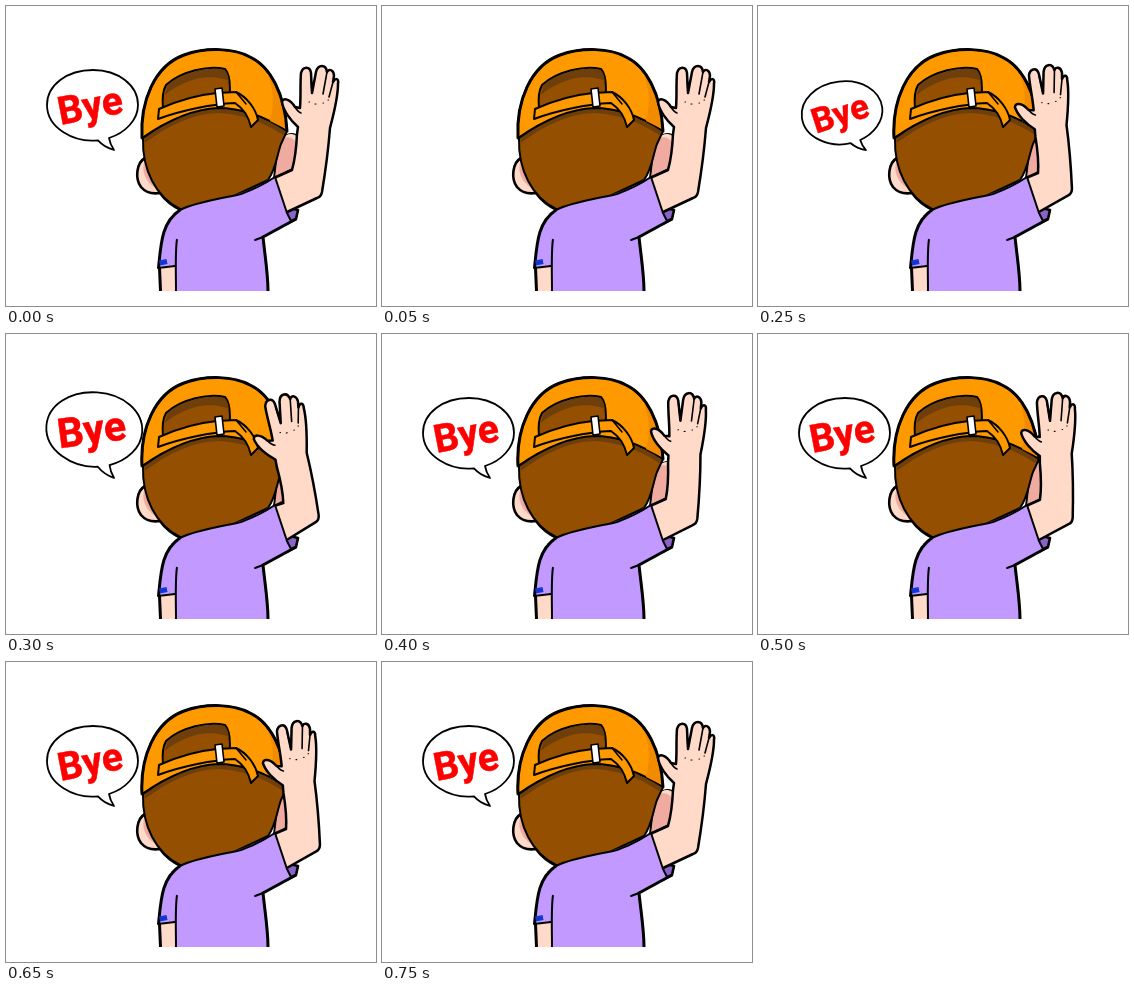
An HTML page for the animation above (1 s loop, 370 px wide and 300 px high).

```html
<!DOCTYPE html>
<html lang="en">
<head>
<meta charset="utf-8">
<title>Waving goodbye</title>
<style>
  html, body { margin: 0; width: 100%; height: 100%; overflow: hidden; background: #fff; }
  svg { display: block; width: 370px; height: 300px; }
  text { font: bold 39px Roboto, Arial, sans-serif; }
  .line { fill: none; }
  .bold { fill: none; stroke-width: 3; }
</style>
</head>
<body>
<svg viewBox="0 0 370 300" stroke="#000" stroke-width="2" stroke-linejoin="round" stroke-linecap="round">
  <!-- ears and neck -->
  <path fill="#ffdac8" stroke-width="2.6" d="M139 152C130 157 129 173 135 181C140 187 147 188 154 187C159 194 166 200 175 204L190 190L150 150Z"/>
  <path fill="#f0aba0" stroke="none" d="M138 157C135 168 142 179 154 185C160 193 167 198 175 202L184 196L150 158Z"/>
  <path fill="#f0aba0" d="M272 138C277 126 291 125 294 134L291 161L268 172Z"/>
  <path fill="#ffdac8" stroke="none" d="M277 132C281 126 291 127 293 134L292 140C289 131 282 130 277 132Z"/>

  <!-- hair -->
  <path fill="#945000" d="M137 132C136 164 150 191 174 203H200L262 174C270 163 271 149 275 138L281 125L211 90Z"/>
  <path fill="#6e3f0b" stroke="none" d="M138 133C164 112 192 103 212 102C238 103 263 113 280 125L277 129C255 114 233 108 212 107C186 108 163 119 139 137Z"/>

  <!-- cap -->
  <path fill="#ff9900" d="M136 132C134 96 148 60 178 49C200 41 228 42 244 51C264 60 279 88 281 125C260 111 236 102 212 102C188 103 162 114 136 132Z"/>
  <path fill="#f28b00" stroke="none" d="M261 66C272 78 279 96 280 123L264 115C269 98 267 81 261 66Z"/>
  <path class="bold" d="M136 132C134 96 148 60 178 49C200 41 228 42 244 51C264 60 279 88 281 125"/>
  <path fill="#945000" d="M157 103C156 92 157 84 160 79C175 65 203 59 219 63C224 69 224 78 224 90Z"/>
  <path fill="#6e3f0b" stroke="none" d="M159 89L161 80C176 66 203 60 218 64C221 66 222 69 223 75C205 67 179 72 159 89Z"/>
  <path fill="#ff9900" d="M153 103C171 95 190 89 211 87L230 86C241 91 250 103 252 114L245 121C243 112 238 103 229 97C207 98 176 104 152 113Z"/>
  <path class="line" stroke-width="1.5" d="M230 86L240 98"/>
  <path fill="#fff" stroke-width="1.6" d="M209 83L216 82L218 100L211 101Z"/>

  <!-- inside of the raised sleeve -->
  <path fill="#8a63c9" stroke-width="2.6" d="M276 200L292 204L290 213L280 218Z"/>
  <path id="arm" fill="#ffdac8" stroke-width="2.5"/>
  <path id="creases" class="line" stroke-width="1.6"/>
  <path id="knuckles" class="line" stroke-width="1.1"/>

  <!-- body -->
  <path fill="#ffdac8" stroke="none" d="M153 261L154 285H171V258Z"/>
  <path class="bold" stroke-linecap="butt" d="M153.500 262L154.500 285"/>
  <path fill="#c299ff" stroke="none" d="M174 204C200 193 238 192 269 171L281 207L285 215L257 232C259 250 262 268 262 285H170V260L152 262C155 236 156 216 174 204Z"/>
  <path class="line" d="M174 204C190 196 209 194 235 188C249 183 260 177 269 171L281 207L285 215M257 231L249 234M152 262L169 260"/>
  <path class="line" stroke-linecap="butt" d="M171 233C169 247 170 268 170 285"/>
  <path class="bold" stroke-linecap="butt" d="M152.500 262C155 236 156 216 174 204M290 213L257 231C259 250 262 268 262 285"/>
  <path stroke="#1238cf" stroke-width="5" stroke-linecap="butt" d="M153.500 257L161 255.500"/>

  <!-- speech bubble, pivoting on the tip of its tail -->
  <g id="bubble">
    <path fill="#fff" stroke-width="1.8" vector-effect="non-scaling-stroke" d="M92 134.300C68 137 41 122 41 99C41 79 61 64 87 64C112 64 132 79 132 99C132 114 119 127 103 132Q104 138 108 144Q98 141 92 134.300Z"/>
    <text transform="translate(54.500 119) rotate(-11)" fill="#f00" stroke="#f00" stroke-width=".5">Bye</text>
  </g>
</svg>
<script>
const $ = id => document.getElementById(id);
const STEP = 50, LOOP = 1000, LAST = 15;
const ELBOW = [298, 194], WRIST = [306, 120];

const hand = `L292,121 C284,114 277,104 276,96
  C277,91 284,93 289,101 L294,102 C295,89 294,78 295,67 C297,60 304,60 305,67 L306,87
  L310,66 C312,58 320,58 321,66 C323,62 328,64 328,70 L327,76 C330,71 333,73 332,78
  C332,92 328,107 324,122`;
const folds = 'M321,66 L317,88 M327,76 L323,91 M305,70 L306,87 M289,101 Q292,106 295,107';
const dots = 'M303,96 L303.500,96 M309,98 L310,98 M317,97 L317.500,97 M322,94 L322.500,94';

// Piecewise linear value through [step, value] keys.
function along(keys, k) {
  const i = Math.max(1, keys.findIndex(p => p[0] >= k));
  const [a, u] = keys[i - 1], [b, v] = keys[i];
  return u + (v - u) * (k - a) / (b - a);
}

const swing = [[0, 0], [3, 0], [6, -18], [9, 2.5], [10, -8], [12, -18], [15, 0]];
const size = [[0, 1], [1, 0], [2, 0.12], [3, 0.385], [5, 0.89], [7, 1.22], [8, 1], [15, 1]];
const tilt = [[0, 0], [1, -48], [3, -28], [7, 14], [8, 0], [15, 0]];

// Turns every coordinate pair of a path about a joint.
function turn(path, deg, [jx, jy]) {
  const r = deg * Math.PI / 180, c = Math.cos(r), s = Math.sin(r);
  return path.replace(/([\d.]+),([\d.]+)/g, (_, px, py) => {
    const x = px - jx, y = py - jy;
    return `${jx + x * c - y * s},${jy + x * s + y * c}`;
  });
}

function draw() {
  const k = Math.min(LAST, Math.floor(performance.now() % LOOP / STEP));
  const angle = along(swing, k);
  const forearm = path => turn(path, angle, ELBOW);
  // The hand lags a little behind the forearm.
  const palm = path => forearm(turn(path, -0.22 * angle, WRIST));

  $('arm').setAttribute('d', `M268,172 ${forearm('L286,164 Q290,150 291,128')} ${palm(hand)}
    ${forearm('C322,148 319,168 316,186 Q315,191 311,192')} L279,207 Z`);
  $('creases').setAttribute('d', palm(folds));
  $('knuckles').setAttribute('d', palm(dots));
  $('bubble').setAttribute('transform',
    `translate(108 144.500) rotate(${along(tilt, k)}) scale(${along(size, k)}) translate(-108 -144.500)`);
  requestAnimationFrame(draw);
}
draw();
</script>
</body>
</html>
```
